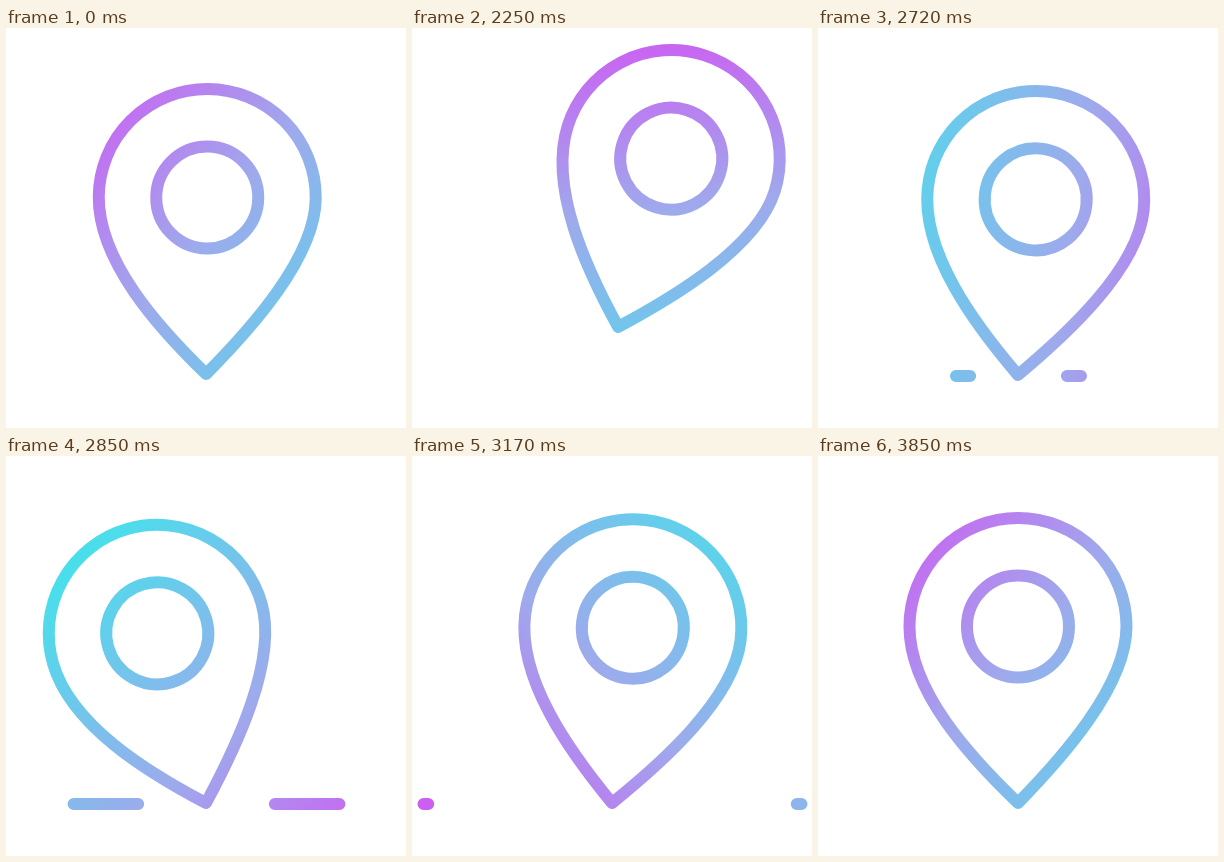
An HTML page with a canvas for the animation above (3.87 s loop, 400 by 400 pixels).

```html
<!DOCTYPE html>
<html lang="en">
<head>
<meta charset="utf-8">
<title>Location pin</title>
<style>
  html, body { margin: 0; height: 100%; overflow: hidden; background: #fff; }
  canvas { display: block; width: 100vmin; height: 100vmin; }
</style>
</head>
<body>
<canvas width="400" height="400"></canvas>
<script>
const canvas = document.querySelector('canvas');
const ctx = canvas.getContext('2d');
const scale = Math.max(1, window.devicePixelRatio || 1);
canvas.width = canvas.height = 400 * scale;

const LOOP = 3870, HOLD = 2020, STEP = 25;
const START = 1995, PEAK = 2528, LAND = 2688;
const TIP = { x: 200, y: 347 };
const HEAD = 176.5, RADIUS = 108.5, HOLE = 51;

const clamp = v => Math.min(1, Math.max(0, v));
const linear = p => p;
const outQuad = p => 1 - (1 - p) ** 2;
const inOutQuad = p => p < .5 ? 2 * p * p : 1 - 2 * (1 - p) ** 2;
const inOutSine = p => (1 - Math.cos(Math.PI * p)) / 2;
const topple = p => inOutSine(p ** 1.12);

// Keys: [time, value, easing towards this key]
function track(keys, t) {
  if (t <= keys[0][0]) return keys[0][1];
  for (let i = 1; i < keys.length; i++) {
    const [t0, a] = keys[i - 1], [t1, b, ease = linear] = keys[i];
    if (t < t1) return a + (b - a) * ease((t - t0) / (t1 - t0));
  }
  return keys[keys.length - 1][1];
}

const lean = [
  [START, 0], [PEAK, 24.4, outQuad], [2930, -22, topple],
  [3190, 7.2, inOutSine], [3620, -3.5, inOutSine], [3850, 0, inOutSine]
];
const lift = [[START, 0], [PEAK, 1, outQuad], [LAND, 0, p => p * p]];
const hueAngle = [[2020, 40], [2600, 155], [2850, 225], [3170, 315], [3450, 372], [3850, 400]];
const hueX = [[2020, 200], [2600, 273], [2850, 232], [3170, 188], [3450, 200]];
const hueY = [[2020, 204], [2600, 156], [2850, 262], [3170, 216], [3450, 204]];

function sweep(t) {
  const a = track(hueAngle, t) * Math.PI / 180;
  const x = track(hueX, t), y = track(hueY, t);
  const dx = Math.cos(a), dy = Math.sin(a);
  const g = ctx.createLinearGradient(x - 180 * dx, y - 180 * dy, x + 220 * dx, y + 220 * dy);
  g.addColorStop(0, 'rgb(204,95,242)');
  g.addColorStop(.45, 'rgb(158,170,236)');
  g.addColorStop(1, 'rgb(74,222,235)');
  return g;
}

function tracePin(t) {
  const up = track(lift, t);
  ctx.save();
  ctx.translate(TIP.x + 8.5 * up, TIP.y - 67 * up);
  ctx.rotate(track(lean, t) * Math.PI / 180);
  ctx.moveTo(0, 0);
  ctx.bezierCurveTo(-48, -46, -RADIUS, -112, -RADIUS, -HEAD);
  ctx.arc(0, -HEAD, RADIUS, Math.PI, 0);
  ctx.bezierCurveTo(RADIUS, -117, 44, -45, 0, 0);
  ctx.closePath();
  ctx.moveTo(HOLE, -HEAD);
  ctx.arc(0, -HEAD, HOLE, 0, 2 * Math.PI);
  ctx.closePath();
  ctx.restore();
}

// Two ground dashes fly apart after the landing
function traceDashes(t) {
  if (t <= 2700 || t >= 3240) return;
  const inner = 48 + 141 * inOutQuad((t - 2700) / 540);
  const outer = 189 - 141 * (1 - clamp((t - 2700) / 470)) ** 2.5;
  for (const side of [-1, 1]) {
    ctx.moveTo(200.5 + side * inner, 348);
    ctx.lineTo(200.5 + side * outer, 348);
  }
}

function draw(now) {
  const clock = now % LOOP;
  const t = clock < HOLD ? 1999 : HOLD + Math.floor((clock - HOLD) / STEP) * STEP;
  ctx.setTransform(scale, 0, 0, scale, 0, 0);
  ctx.clearRect(0, 0, 400, 400);
  ctx.beginPath();
  tracePin(t);
  traceDashes(t);
  ctx.lineWidth = 12;
  ctx.lineCap = ctx.lineJoin = 'round';
  ctx.strokeStyle = sweep(t);
  ctx.stroke();
}

const begin = performance.now();
function tick() {
  draw(performance.now() - begin);
  requestAnimationFrame(tick);
}
tick();
</script>
</body>
</html>
```
